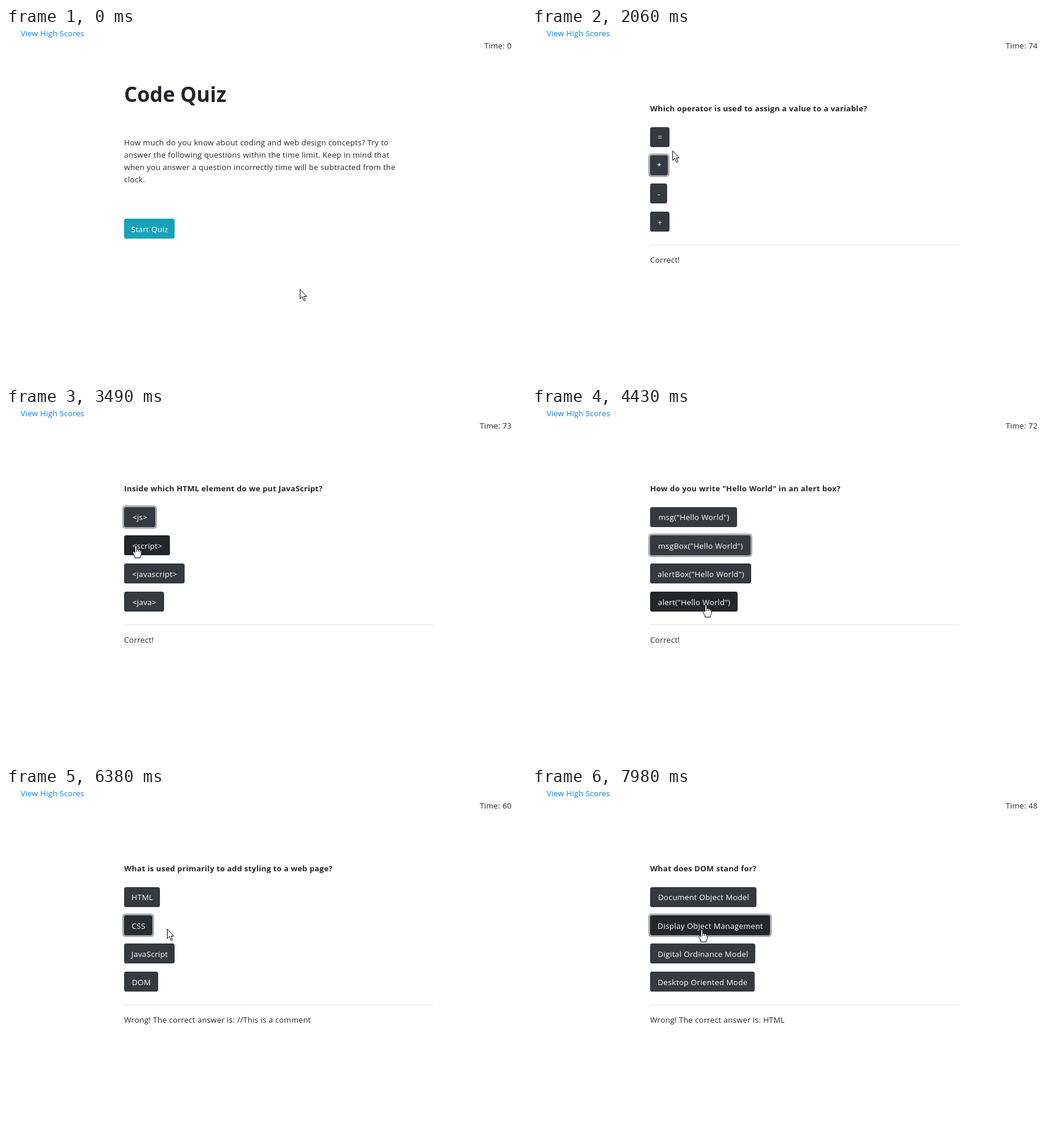
Recreate the animation shown at these times as an HTML page. Size 885 by 600 pixels, loop 8 s.

```html
<!DOCTYPE html>
<html lang="en">
<head>
<meta charset="utf-8">
<title>Code Quiz</title>
<style>
  html, body { margin: 0; width: 100%; height: 100%; overflow: hidden; background: #fff; }
  svg { display: block; width: 885px; height: 600px; }
  text { font: 13.2px "Open Sans", "Noto Sans", sans-serif; letter-spacing: .25px; fill: #212529; white-space: pre; }
  .link { fill: #007bff; }
  .title { font-size: 34.9px; font-weight: 700; letter-spacing: 0; }
  .question { font-weight: 700; }
  .label { fill: #fff; text-anchor: middle; }
  .time { text-anchor: end; }
</style>
</head>
<body>
<svg id="stage" viewBox="0 0 885 600">
  <text class="link" x="25" y="14">View High Scores</text>
  <text class="time" id="time" x="860.500" y="35"></text>
  <g id="scenes"></g>
  <g id="pointer" fill="#fff" stroke="#000" stroke-linejoin="round">
    <path id="arrow" d="M.5.5v16l3.7-3.4 2.8 6.6q1.4 1.2 2.6-.7l-2.9-6.5h4.8z"/>
    <g id="hand">
      <path d="M-1.5 12V2Q-1.500.5 0 .5T1.500 2V7Q3.500 5.800 4.500 7.500 6.500 6.500 7.300 8.500 9.500 8 9.500 10.500V14.500Q9.500 16.500 7.500 18.500V21.500H-1.500V19L-5 13.500Q-5.300 11-3.500 10.800 -2.300 11-1.500 12.500"/>
      <path fill="none" d="M1.500 7v4M4.500 7.500V11M7.300 8.500V11.500"/>
    </g>
  </g>
</svg>
<script>
const LOOP = 8000, TIMER_START = 575, FADE = 150;
const LEFT = 201, HEIGHT = 34, RING = 3, TOPS = [169, 217, 265, 313], BASELINES = [191, 240, 288, 336];
const DARK = [[52, 58, 64], [35, 39, 43]], INFO = [[23, 162, 184], [19, 132, 150]];

// focus: index of the button clicked on the previous screen
const scenes = [
  { at: 0, intro: true, options: [["Start Quiz", 86]] },
  { at: TIMER_START, question: "Which event occurs when the user clicks on an HTML element?",
    options: [["onmouseclick", 110], ["onclick", 68], ["onchange", 87], ["oncommand", 104]] },
  { at: 1800, question: "Which operator is used to assign a value to a variable?", focus: 1, result: "Correct!",
    options: [["=", 33], ["*", 30], ["-", 29], ["+", 33]] },
  { at: 2650, question: "Inside which HTML element do we put JavaScript?", focus: 0, result: "Correct!",
    options: [["<js>", 53], ["<script>", 78], ["<javascript>", 103], ["<java>", 68]] },
  { at: 3720, question: "How do you write \"Hello World\" in an alert box?", focus: 1, result: "Correct!",
    options: [["msg(\"Hello World\")", 148], ["msgBox(\"Hello World\")", 171],
              ["alertBox(\"Hello World\")", 172], ["alert(\"Hello World\")", 149]] },
  { at: 4620, question: "How can you add a comment in JavaScript?", focus: 3, result: "Correct!",
    options: [["This is a comment", 138], ["<!--This is a comment-->", 185],
              ["//This is a comment", 149], ["*This is a comment*", 150]] },
  { at: 6350, question: "What is used primarily to add styling to a web page?", focus: 1, penalty: 10,
    result: "Wrong! The correct answer is: //This is a comment",
    options: [["HTML", 61], ["CSS", 48], ["JavaScript", 86], ["DOM", 58]] },
  { at: 7050, question: "What does DOM stand for?", focus: 1, penalty: 10,
    result: "Wrong! The correct answer is: HTML",
    options: [["Document Object Model", 181], ["Display Object Management", 204],
              ["Digital Ordinance Model", 179], ["Desktop Oriented Mode", 178]] },
];

// pointer path: time, x, y
const path = [
  [0, 500, 445], [30, 500, 445], [250, 370, 375], [450, 255, 340], [600, 250, 337], [830, 247, 311],
  [1250, 243, 236], [1830, 241, 234], [2060, 239, 209], [2350, 221, 187], [2680, 220, 187],
  [3050, 224, 353], [3400, 221, 234], [3760, 221, 234], [4250, 296, 335], [4680, 297, 335],
  [4950, 298, 322], [5300, 298, 238], [5800, 298, 238], [6200, 274, 240], [6390, 274, 240],
  [6750, 216, 240], [7570, 215, 240], [7980, 289, 241], [LOOP, 289, 241],
];

const byId = id => document.getElementById(id);

function add(parent, tag, attrs, content = "") {
  const node = document.createElementNS("http://www.w3.org/2000/svg", tag);
  for (const key in attrs) node.setAttribute(key, attrs[key]);
  node.textContent = content;
  return parent.appendChild(node);
}

const addText = (parent, content, y, kind = "") => add(parent, "text", { x: LEFT, y, class: kind }, content);

function build(scene) {
  const group = scene.group = add(byId("scenes"), "g", {});
  if (scene.intro) {
    addText(group, "Code Quiz", 126, "title");
    ["How much do you know about coding and web design concepts? Try to",
     "answer the following questions within the time limit. Keep in mind that",
     "when you answer a question incorrectly time will be subtracted from the",
     "clock."].forEach((line, i) => addText(group, line, 200 + 21 * i));
  } else {
    addText(group, scene.question, 142, "question");
  }
  scene.buttons = scene.options.map(([label, width], i) => {
    const top = scene.intro ? 325 : TOPS[i];
    if (i === scene.focus) {
      add(group, "rect", { x: LEFT - RING, y: top - RING, width: width + 2 * RING, height: HEIGHT + 2 * RING, rx: 5.5, fill: "#a8abae" });
    }
    const box = add(group, "rect", { x: LEFT, y: top, width, height: HEIGHT, rx: 3.6 });
    add(group, "text", { x: LEFT + width / 2 + .5, y: scene.intro ? 348 : BASELINES[i], class: "label" }, label);
    return { box, top, width };
  });
  if (scene.result) {
    add(group, "rect", { x: LEFT, y: 369, width: 526, height: 1, fill: "#e5e5e5" });
    addText(group, scene.result, 400);
  }
}

const sceneAt = t => scenes.findLast(scene => scene.at <= t) || scenes[0];

function pointerAt(t) {
  const i = Math.max(1, path.findIndex(step => step[0] > t));
  const [t0, x0, y0] = path[i - 1], [t1, x1, y1] = path[i];
  const k = Math.max(0, (t - t0) / (t1 - t0));
  return [Math.round(x0 + (x1 - x0) * k), Math.round(y0 + (y1 - y0) * k)];
}

function hoveredAt(t) {
  const [x, y] = pointerAt(t);
  return sceneAt(t).buttons.findIndex(b => x >= LEFT && x < LEFT + b.width && y >= b.top && y < b.top + HEIGHT);
}

// Share of the last FADE ms spent over each button; buttons keep their shade when the question changes.
function hoverShares(t, scene) {
  const shares = scene.buttons.map(() => 0), samples = 10;
  for (let i = 0; i < samples; i++) {
    const past = t - FADE * i / samples;
    if (sceneAt(past).intro !== scene.intro) continue;
    const hit = hoveredAt(past);
    if (hit >= 0) shares[hit] += 1 / samples;
  }
  return shares;
}

function secondsLeft(t) {
  if (t < TIMER_START) return 0;
  const lost = scenes.reduce((sum, s) => sum + (s.at <= t && s.penalty || 0), 0);
  return 75 - Math.floor((t - TIMER_START) / 1000) - lost;
}

function draw(t) {
  const scene = sceneAt(t);
  for (const s of scenes) s.group.style.display = s === scene ? "" : "none";
  const [rest, hover] = scene.intro ? INFO : DARK;
  hoverShares(t, scene).forEach((share, i) => {
    const rgb = rest.map((c, n) => Math.round(c + (hover[n] - c) * share));
    scene.buttons[i].box.setAttribute("fill", `rgb(${rgb})`);
  });
  byId("time").textContent = "Time: " + secondsLeft(t);
  const over = hoveredAt(t) >= 0;
  byId("hand").style.display = over ? "" : "none";
  byId("arrow").style.display = over ? "none" : "";
  byId("pointer").setAttribute("transform", `translate(${pointerAt(t)})`);
}

scenes.forEach(build);
const start = performance.now();
function tick() {
  draw((performance.now() - start) % LOOP);
  requestAnimationFrame(tick);
}
tick();
</script>
</body>
</html>
```
